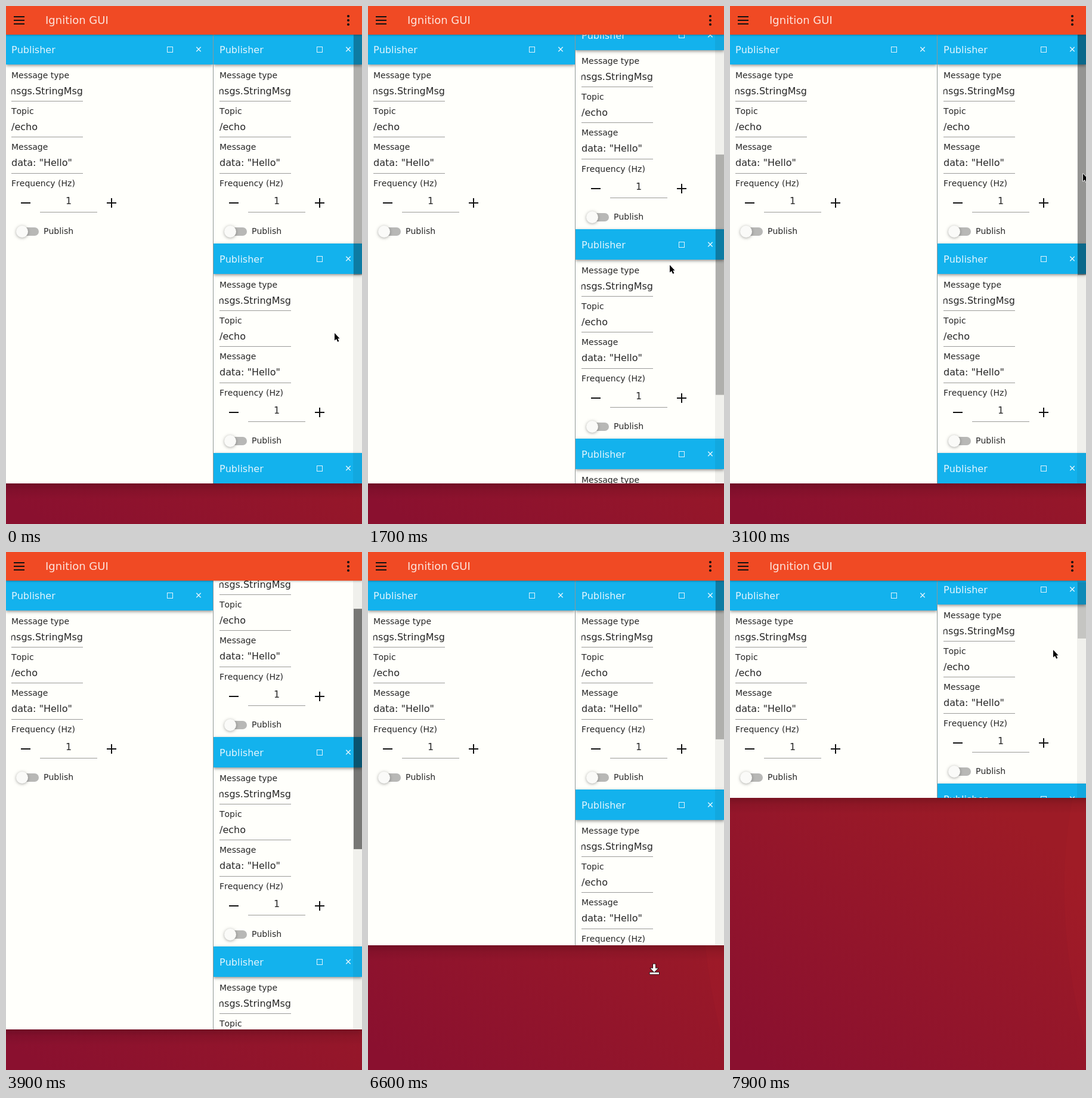
Recreate the animation shown at these times as an HTML page with a canvas. Size 597x868 px, loop 8 s.

```html
<!DOCTYPE html>
<html lang="en">
<head>
<meta charset="utf-8">
<title>Publisher panels</title>
<style>
html, body { margin: 0; width: 100%; height: 100%; overflow: hidden; }
canvas { display: block; }
</style>
</head>
<body>
<canvas id="stage" width="597" height="868"></canvas>
<script>
const ctx = document.getElementById('stage').getContext('2d');
const W = 597, HEIGHT = 868, TOP = 48, CARD = 351, CARDS = 4, LOOP = 8000, STEP = 100;
const INK = '#262626', PALE = '#e3f5fd', BLUE = '#13b2ed', PAPER = '#fffffb', RULE = '#9b9b99';
ctx.fontKerning = 'none';

// Progress from 0 to 1 between two times
const linear = (t, from, to) => Math.min(1, Math.max(0, (t - from) / (to - from)));
const smooth = (t, from, to) => {
  const p = linear(t, from, to);
  return p * p * (3 - 2 * p);
};
const glide = (t, from, to) => 1 - (1 - linear(t, from, to)) ** 1.4;

// Wheel down and up, a scrollbar drag that lags behind, then one wheel click
function scrollAt(t) {
  const wheel = 652 * (smooth(t, 500, 1400) - glide(t, 1400, 2320));
  const dragTime = t > 3500 ? Math.floor((t - 100) / 200) * 200 + 100 : t;
  const drag = 255 * Math.sin(Math.PI * linear(dragTime, 3100, 4100)) ** 2;
  return wheel + drag + 10 * smooth(t, 7700, 7900);
}

// Bottom edge of the window while it is resized
function bottomAt(t) {
  return 800 - 675 * glide(t, 5700, 6100) + 596 * smooth(t, 6200, 6700) - 309 * smooth(t, 6700, 7200);
}

function thumbAlphaAt(t) {
  return .27 + .23 * (linear(t, 3000, 3200) - linear(t, 4300, 4600)) - .09 * linear(t, 7600, 7900);
}

const isResizing = t => t >= 5300 && t < 7300;

// Pointer moves: start, end, x, y
const moves = [[200, 400, 485, 433], [500, 1400, 506, 434], [2300, 2800, 592, 281], [3100, 3300, 602, 281],
  [4200, 4700, 498, 560], [4700, 5100, 562, 795], [7200, 7700, 542, 164]];

function pointerAt(t) {
  if (isResizing(t)) {
    const lead = t > 6200 ? 50 : 0;
    return [550 - 35 * linear(t, 5200, 5400) - 35 * linear(t, 5800, 6600), bottomAt(t + lead) - 14];
  }
  let x = 551, y = 548;
  for (const [from, to, toX, toY] of moves) {
    const p = smooth(t, from, to);
    x += (toX - x) * p;
    y += (toY - y) * p;
  }
  return [x, y];
}

function rect(x, y, w, h, color) {
  ctx.fillStyle = color;
  ctx.fillRect(x, y, w, h);
}

function text(str, x, y, size, color = INK, align = 'left') {
  ctx.font = size + 'px "DejaVu Sans", sans-serif';
  ctx.textAlign = align;
  ctx.fillStyle = color;
  ctx.fillText(str, x, y);
}

function disc(x, y, r, color) {
  ctx.fillStyle = color;
  ctx.beginPath();
  ctx.arc(x, y, r, 0, 7);
  ctx.fill();
}

function clipped(x, y, w, h, draw) {
  ctx.save();
  ctx.beginPath();
  ctx.rect(x, y, w, h);
  ctx.clip();
  draw();
  ctx.restore();
}

function shadowed(blur, dy, alpha, draw) {
  ctx.save();
  ctx.shadowBlur = blur;
  ctx.shadowOffsetY = dy;
  ctx.shadowColor = `rgba(0,0,0,${alpha})`;
  draw();
  ctx.restore();
}

function wallpaper() {
  const g = ctx.createLinearGradient(60, 868, 420, 400);
  g.addColorStop(0, '#8a102f');
  g.addColorStop(1, '#9d1b26');
  rect(0, 0, W, HEIGHT, g);
  ctx.fillStyle = 'rgba(255,70,50,.035)';
  ctx.beginPath();
  ctx.moveTo(577, 400);
  ctx.quadraticCurveTo(535, 600, 600, 840);
  ctx.lineTo(600, 400);
  ctx.fill();
}

function header(x, y, w, textX, iconX) {
  shadowed(5, 2, .42, () => rect(x, y - 1, w, 51, BLUE));
  text('Publisher', textX, y + 31, 16, PALE);
  ctx.strokeStyle = PALE;
  ctx.lineWidth = 1;
  ctx.strokeRect(iconX - 4.5, y + 20.5, 9, 9);
  ctx.lineWidth = 1.4;
  ctx.beginPath();
  for (const d of [-3.7, 3.7]) {
    ctx.moveTo(iconX + 48 - d, y + 20.8);
    ctx.lineTo(iconX + 48 + d, y + 28.2);
  }
  ctx.stroke();
}

function field(label, value, y, lineY, align = 'left') {
  text(label, 9, y, 14);
  clipped(9, y, 120, 40, () => text(value, align === 'left' ? 9 : 129, y + 27, 16, INK, align));
  rect(9, lineY, 120, 1, RULE);
}

// Form laid out relative to the top of its card
function form(x, y) {
  ctx.save();
  ctx.translate(x, y);
  field('Message type', 'ignition.msgs.StringMsg', 73, 111, 'right');
  field('Topic', '/echo', 133, 171);
  field('Message', 'data: "Hello"', 193, 232);
  text('Frequency (Hz)', 9, 254, 14);
  text('1', 105, 284, 16, INK, 'center');
  rect(57, 297, 96, 1, RULE);
  rect(25, 281, 16, 2, '#111');
  rect(169, 281, 16, 2, '#111');
  rect(176, 274, 2, 16, '#111');
  ctx.fillStyle = '#b8b8b6';
  ctx.beginPath();
  ctx.roundRect(19, 323, 36, 14, 7);
  ctx.fill();
  shadowed(5, 1, .35, () => disc(27, 330, 10, '#fafaf8'));
  text('Publish', 63, 334, 14);
  ctx.restore();
}

function toolbar() {
  shadowed(3, 1, .3, () => rect(0, 0, W, TOP, '#f04a24'));
  text('Ignition GUI', 66, 30, 18, '#fde4dc');
  for (const i of [-1, 0, 1]) {
    rect(13, 23 + 6 * i, 18, 2, '#111');
    disc(574, 24 + 7 * i, 2.1, '#111');
  }
}

function app(scroll, bottom, thumbAlpha) {
  const view = bottom - TOP, total = CARD * CARDS;
  const g = ctx.createLinearGradient(0, bottom, 0, bottom + 27);
  g.addColorStop(0, 'rgba(0,0,0,.2)');
  g.addColorStop(.4, 'rgba(0,0,0,.07)');
  g.addColorStop(1, 'rgba(0,0,0,0)');
  rect(0, bottom, W, 27, g);
  clipped(0, TOP, W, view, () => {
    rect(0, TOP, W, view, PAPER);
    clipped(0, TOP, 347, view, () => {
      header(0, TOP, 347, 9, 275);
      form(0, TOP);
    });
    clipped(348, TOP, 249, view, () => {
      for (let i = 0; i < CARDS; i++) {
        const y = TOP + i * CARD - scroll;
        header(348, y, 249, 358, 526);
        form(349, y);
      }
    });
    rect(347, TOP, 1, view, '#8f9696');
    rect(582, TOP, 15, view, 'rgba(0,0,0,.06)');
    rect(583, TOP + scroll * view / total, 14, view * view / total, `rgba(0,0,0,${thumbAlpha})`);
  });
  toolbar();
}

function pointer(x, y, resizing) {
  ctx.save();
  ctx.translate(x, y);
  const shape = resizing
    ? new Path2D('M-2 .5H2V7.5H6.5L0 14L-6.5 7.5H-2ZM-7.5 14.5H8V17.5H-7.5Z')
    : new Path2D('M0 0V12.5L3 10L5.2 14.8L7.4 13.8L5.2 9.2H8.6Z');
  ctx.lineJoin = 'round';
  ctx.lineWidth = 1.5;
  ctx.strokeStyle = resizing ? '#000' : '#fff';
  ctx.fillStyle = resizing ? '#fff' : '#000';
  ctx.stroke(shape);
  ctx.fill(shape);
  ctx.restore();
}

function frame(now) {
  const t = Math.floor(now % LOOP / STEP) * STEP;
  const [x, y] = pointerAt(t);
  wallpaper();
  app(Math.round(scrollAt(t)), Math.round(bottomAt(t)), thumbAlphaAt(t));
  pointer(Math.round(x), Math.round(y), isResizing(t));
  requestAnimationFrame(frame);
}
requestAnimationFrame(frame);
</script>
</body>
</html>
```
